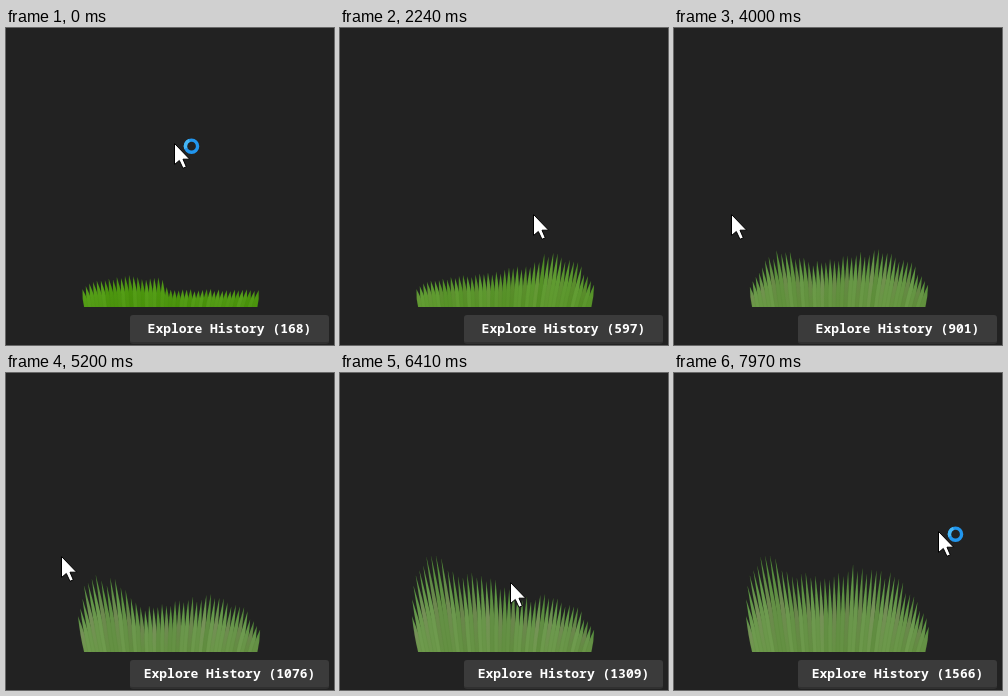
An HTML page with a canvas for the animation above (8000 ms loop, 328 px wide and 317 px high).

```html
<!DOCTYPE html>
<html lang="en">
<head>
<meta charset="utf-8">
<title>Growing grass</title>
<style>
  html, body { margin: 0; width: 100%; height: 100%; overflow: hidden; background: #222; }
  #stage { position: relative; width: 328px; height: 317px; overflow: hidden; }
  canvas, svg { position: absolute; left: 0; top: 0; width: 328px; height: 317px; }
  #history {
    position: absolute; left: 124px; top: 287px; width: 199px; height: 27px;
    border-radius: 3px; border-bottom: 2px solid #303030; background: #3b3b3b;
    color: #fff; text-align: center; white-space: pre;
    font: 600 13px/27px "Noto Sans Mono", "DejaVu Sans Mono", monospace;
  }
</style>
</head>
<body>
<div id="stage">
  <canvas id="grass"></canvas>
  <div id="history"></div>
  <svg viewBox="0 0 328 317">
    <g id="pointer">
      <path d="M-.5-.5V20.5L4.3 16.5L8 24.3L11.3 22.8L8 15.2H14.7Z" fill="#fff" stroke="#000"/>
      <g id="busy" fill="none" stroke-width="3.4">
        <circle cx="16.5" cy="2.2" r="6.1" stroke="#2196ee"/>
        <path d="M10.8 4.4A6.1 6.1 0 0 1 14.3-3.5" stroke="#45b6f5"/>
      </g>
    </g>
  </svg>
</div>
<script>
const LOOP = 8000, STEP = 135, COUNT = 45;
const GROUND = 279, MIDDLE = 165, LEAN = 0.003, HALF = 2.9, BEND = 0.45;

// time, pointer x, pointer y, counter
const path = [[0, 169, 116, 168], [1100, 272, 176, 391], [2240, 194, 187, 597],
  [4000, 58, 187, 901], [4510, 41, 190, 975], [5200, 56, 184, 1076],
  [6410, 171, 210, 1309], [7970, 265, 159, 1566]];

// Each sweep raises the blades along an outline of [root x, height]
const sweeps = [
  { end: 0, dir: 1, outline: [[81, 19], [101, 29], [126, 30], [155, 28], [165, 17], [249, 17]] },
  { end: 1100, dir: 1, outline: [[150, 26], [178, 34], [205, 37], [222, 32], [240, 17]] },
  { end: 2240, dir: -1, outline: [[135, 30], [160, 35], [190, 43], [204, 54], [228, 45], [249, 22]] },
  { end: 4000, dir: -1, outline: [[81, 20], [101, 48], [118, 57], [140, 43], [175, 52], [203, 55]] },
  { end: 5200, dir: -1, outline: [[81, 34], [97, 77], [120, 69], [136, 46]] },
  { end: 6410, dir: 1, outline: [[81, 36], [91, 76], [104, 98], [125, 80], [178, 62]] },
  { end: 7970, dir: 1, outline: [[128, 71], [160, 74], [182, 86], [210, 74], [228, 58], [249, 26]] }
];

const clamp = v => Math.max(0, Math.min(1, v));
const mix = (a, b, p) => a + (b - a) * p;
const rand = n => { const v = Math.sin(n * 127.1 + 3.7) * 43758.5453; return v - Math.floor(v); };

// Interpolates a keyed row list at position p (column 0 is the key)
function sample(rows, p) {
  const next = rows.findIndex(r => r[0] >= p);
  if (next < 0) return rows.at(-1);
  const b = rows[next], a = rows[Math.max(0, next - 1)];
  const u = a === b ? 0 : (p - a[0]) / (b[0] - a[0]);
  return a.map((v, k) => mix(v, b[k], u));
}

const blades = Array.from({ length: COUNT }, (_, i) => mix(81, 248.5, i / (COUNT - 1)));

// The picture moves in equal steps within each sweep
const steps = [0];
sweeps.forEach((s, n) => {
  s.start = n ? sweeps[n - 1].end : -1;
  const count = Math.round((s.end - s.start) / STEP);
  for (let i = 1; i <= count; i++) steps.push(mix(s.start, s.end, i / count));
});

function heightAt(i, t) {
  const x = blades[i];
  return sweeps.reduce((h, { start, end, dir, outline }, n) => {
    const v = (x - outline[0][0]) / (outline.at(-1)[0] - outline[0][0]);
    if (v < -0.01 || v > 1.01) return h;
    const order = clamp(dir > 0 ? v : 1 - v), u = clamp((t - start) / (end - start));
    const goal = sample(outline, x)[1] * mix(0.92, 1.06, rand(i + n * COUNT));
    return mix(h, Math.max(h, goal), clamp((u - order * 0.75) / 0.25));
  }, 0);
}

const $ = id => document.getElementById(id);
const canvas = $("grass"), ctx = canvas.getContext("2d");
const ratio = window.devicePixelRatio || 1;
canvas.width = 328 * ratio;
canvas.height = 317 * ratio;
ctx.scale(ratio, ratio);

function drawBlade(x, i, h, age) {
  const shade = (rand(i + 60) - 0.5) * 14;
  const tone = (a, b) => `rgb(${a.map((v, k) => Math.round(mix(v, b[k], age) + shade))})`;
  const top = GROUND - h, bend = GROUND - h * BEND;
  const lean = (x - MIDDLE) * LEAN * h, mid = x + lean * BEND;
  const fill = ctx.createLinearGradient(0, GROUND, 0, top);
  fill.addColorStop(0, tone([78, 150, 16], [104, 148, 70]));
  fill.addColorStop(0.5, tone([80, 154, 18], i % 3 ? [104, 148, 74] : [114, 140, 84]));
  fill.addColorStop(1, tone([80, 150, 24], [86, 148, 66]));
  ctx.beginPath();
  ctx.moveTo(x - HALF, GROUND);
  ctx.quadraticCurveTo(mid - HALF, bend, x + lean, top);
  ctx.quadraticCurveTo(mid + HALF, bend, x + HALF, GROUND);
  ctx.fillStyle = fill;
  ctx.fill();
  ctx.strokeStyle = "rgba(60,110,30,.2)";
  ctx.lineWidth = 0.5;
  ctx.stroke();
}

function draw(t) {
  ctx.clearRect(0, 0, 328, 317);
  blades.forEach((x, i) => drawBlade(x, i, heightAt(i, t), clamp(t / 4500)));
  const [, x, y, count] = sample(path, t);
  $("pointer").setAttribute("transform", `translate(${x} ${y})`);
  $("busy").style.display = t === 0 || t === steps.at(-1) ? "" : "none";
  $("history").textContent = `Explore History (${Math.round(count)})`;
}

let shown = -1;
const begin = performance.now();
function frame() {
  const now = (performance.now() - begin) % LOOP;
  const t = steps.findLast(s => s <= now + 0.01);
  if (t !== shown) draw(shown = t);
  requestAnimationFrame(frame);
}
frame();
</script>
</body>
</html>
```
